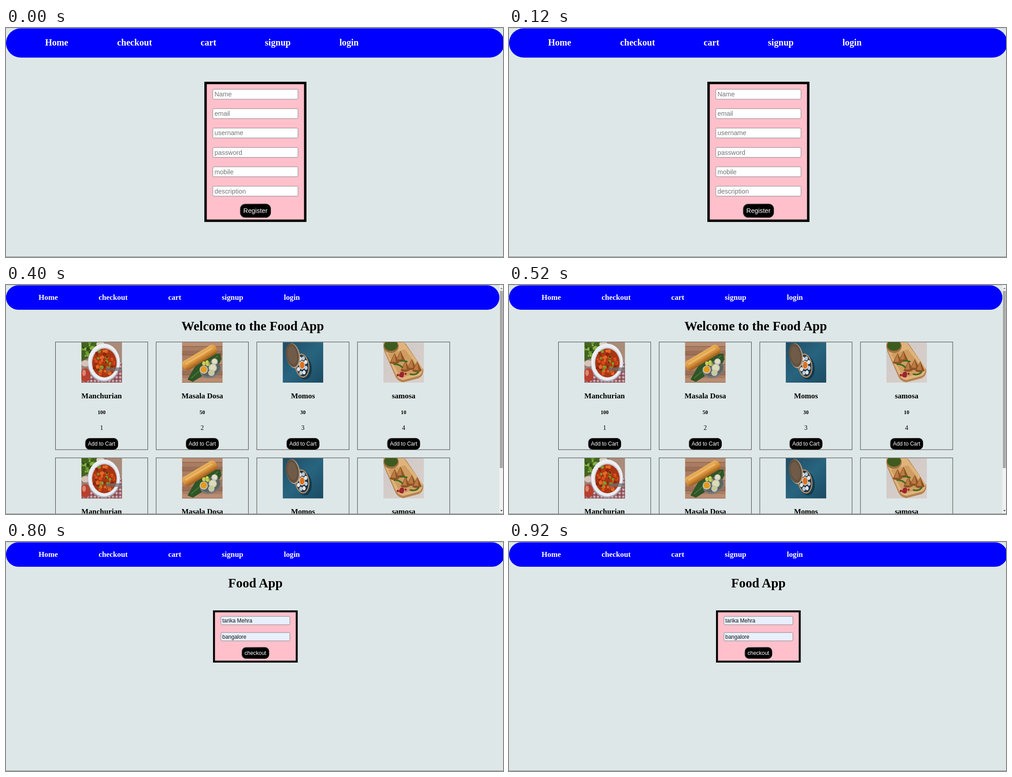
An HTML page for the animation above (1 s loop, 1100 by 509 pixels).

```html
<!DOCTYPE html>
<html lang="en">
<head>
<meta charset="utf-8">
<title>Food App</title>
<style>
  html, body { margin: 0; width: 100%; height: 100%; overflow: hidden; background: #dee7e7; }
  svg { display: block; width: 1100px; height: 509px; }
  .serif { font-family: "Liberation Serif", "Times New Roman", serif; }
  .sans { font-family: "Liberation Sans", Arial, sans-serif; }
  .url { font-family: "Open Sans", "Noto Sans", sans-serif; }
  .bold { font-weight: 700; }
  .mid { text-anchor: middle; }
</style>
</head>
<body>
<svg id="stage" viewBox="0 0 1100 509" xmlns="http://www.w3.org/2000/svg"></svg>
<script>
const STEP = 200;
const H1 = 28.7, H3 = 16.79, H5 = 11.9, BODY = 14.35, FIELD = 11.96;

const text = (x, y, size, label, cls, fill = '#000') =>
  `<text x="${x}" y="${y}" font-size="${size}" class="${cls}" fill="${fill}">${label}</text>`;
const rect = (x, y, w, h, fill, more = '') =>
  `<rect x="${x}" y="${y}" width="${w}" height="${h}" fill="${fill}" ${more}/>`;
const oval = (x, y, rx, ry, fill, more = '') =>
  `<ellipse cx="${x}" cy="${y}" rx="${rx}" ry="${ry}" fill="${fill}" ${more}/>`;
const path = (d, fill, more = '') => `<path d="${d}" fill="${fill}" ${more}/>`;
const turn = (a, x, y) => `transform="rotate(${a} ${x} ${y})"`;

function seeded(seed) {
  return () => (seed = (seed * 16807) % 2147483647) / 2147483647;
}

// Small blobs scattered evenly inside an oval
function scatter(n, seed, cx, cy, rx, ry, colors) {
  const rnd = seeded(seed);
  return Array.from({ length: n }, (_, i) => {
    const a = rnd() * 6.283, d = Math.sqrt(rnd()), r = 2 + rnd() * 2.2;
    return oval((cx + rx * d * Math.cos(a)).toFixed(1), (cy + ry * d * Math.sin(a)).toFixed(1),
      r.toFixed(1), (r * 1.1).toFixed(1), colors[i % colors.length]);
  }).join('');
}

// Dishes, each on a 90 x 90 tile
const dishes = {
  manchurian: () =>
    rect(0, 0, 90, 90, '#97807d') +
    rect(55, 0, 35, 40, '#a98b78') +
    rect(0, 62, 90, 28, 'url(#cloth)') +
    rect(70, 45, 20, 45, 'url(#cloth)') +
    path('M0 0H42L30 14L18 34L0 42Z', '#42641f') +
    scatter(22, 11, 14, 16, 15, 17, ['#6f9a33', '#2f4c18', '#8bb146']) +
    oval(42, 4, 9, 6, '#d9d2bd') +
    oval(9, 47, 9, 7, '#d8c4b6') +
    oval(9, 73, 11, 15, '#b8402f') +
    oval(6, 68, 4, 7, '#d98672') +
    oval(50, 46, 36, 42, '#aeb3bd') +
    oval(50, 44, 35, 41, '#eceef2') +
    oval(51, 45, 29, 34, '#c9ccd3') +
    oval(51, 46, 27, 32, '#a83512') +
    scatter(58, 5, 51, 46, 25, 30, ['#d8501b', '#b5340f', '#e4682a', '#7c9a2c', '#8c260c']) +
    rect(54, 56, 36, 8, '#6d6a6c', 'opacity=".7"'),

  dosa: () =>
    rect(0, 0, 90, 90, '#a97d63') +
    [0, 19, 40, 63, 80].map((y, i) =>
      rect(0, y, 90, 9, i % 2 ? '#9b6e55' : '#b98d71') + rect(0, y + 9, 90, 1, '#80573f')).join('') +
    path('M12 83L28 55L58 27L85 25L87 38L76 62L48 73L24 88Z', '#2f5527') +
    path('M20 80L52 52L80 30', 'none', 'stroke="#4b7a38" stroke-width="2"') +
    oval(63, 61, 24, 18, '#77787a', turn(-20, 63, 61)) +
    oval(63, 59, 22, 16, '#5e655c', turn(-20, 63, 59)) +
    `<g ${turn(-31, 40, 34)}>` +
      rect(-3, 22, 85, 23, 'url(#crust)', 'rx="9"') +
      rect(4, 28, 70, 4, '#f1c175', 'rx="2" opacity=".7"') +
    '</g>' +
    scatter(9, 23, 54, 47, 6, 5, ['#a9bd3f', '#d2cf5e']) +
    [[48, 61, 9, '#e39a1c'], [68, 57, 9, '#dcdcb4'], [72, 43, 7, '#e4ddc6'], [65, 68, 7, '#c5cb95']]
      .map(([x, y, r, c]) => oval(x, y, r, r, '#c4c4bf') + oval(x, y - .5, r - 2, r - 2, c)).join(''),

  momos: () =>
    rect(0, 0, 90, 90, 'url(#sea)') +
    oval(47, 56, 17, 27, '#123a4e', turn(-8, 47, 56)) +
    oval(43, 52, 16, 27, '#b38b63', turn(-8, 43, 52)) +
    oval(43, 52, 13.5, 24, '#1c3448', turn(-8, 43, 52)) +
    Array.from({ length: 8 }, (_, i) => {
      const a = i * Math.PI / 4 + .3;
      return oval((43 + 9 * Math.cos(a)).toFixed(1), (52 + 17 * Math.sin(a)).toFixed(1), 3.6, 4.6,
        i % 2 ? '#dfe5e8' : '#b9c9d3');
    }).join('') +
    oval(43, 51, 6.5, 10, '#e6d8c6') +
    oval(43, 51, 5, 8, '#dd701f') +
    oval(23, 30, 15, 28, '#b9a084', turn(-10, 23, 30)) +
    oval(21.5, 29, 14, 26.5, '#64503f', turn(-10, 21, 29)) +
    oval(21.5, 29, 10, 20, '#705b48', turn(-10, 21, 29)),

  samosa: () =>
    rect(0, 0, 90, 90, 'url(#stone)') +
    path('M2 20L27 77Q32 87 44 89L78 80Q90 74 88 60L50 4Q46 0 40 0H0Z', '#b5834f') +
    path('M2 16L28 73Q33 82 44 84L78 75Q88 70 86 57L48 4Q45 0 40 0H0Z', '#dfb47c') +
    path('M10 26L33 69Q37 76 46 77L74 69Q81 65 79 57L48 16Z', '#cf9d62') +
    oval(17, 9, 17, 15, '#a17240') +
    oval(17, 7, 15, 12, '#3e5b1f') +
    [[24, 37], [37, 32], [48, 54], [62, 50], [74, 55]].map(([x, y]) =>
      path(`M${x - 10} ${y + 9}L${x + 1} ${y - 13}L${x + 11} ${y + 8}Q${x} ${y + 15} ${x - 10} ${y + 9}Z`, '#8f5427') +
      path(`M${x - 7} ${y + 6}L${x + 1} ${y - 11}L${x + 4} ${y + 7}Z`, '#bd7b41')).join('') +
    path('M24 49Q34 48 42 56M60 71Q72 74 78 66M38 40L52 43', 'none',
      'stroke="#3f6a22" stroke-width="3.5" stroke-linecap="round"') +
    scatter(8, 31, 40, 71, 10, 5, ['#9c2430']),
};

const menu = [
  { dish: 'manchurian', name: 'Manchurian', price: 100, id: 1 },
  { dish: 'dosa', name: 'Masala Dosa', price: 50, id: 2 },
  { dish: 'momos', name: 'Momos', price: 30, id: 3 },
  { dish: 'samosa', name: 'samosa', price: 10, id: 4 },
];

const defs = `<defs>
  <pattern id="cloth" width="8" height="8" patternUnits="userSpaceOnUse">
    <rect width="8" height="8" fill="#cbb9bb"/><rect width="4" height="8" fill="#84343f" opacity=".65"/>
    <rect width="8" height="4" fill="#84343f" opacity=".65"/></pattern>
  <linearGradient id="crust" x2="0" y2="1"><stop stop-color="#e9b25c"/><stop offset=".55" stop-color="#d8923a"/><stop offset="1" stop-color="#9a5a1c"/></linearGradient>
  <linearGradient id="sea" x2="1" y2="1"><stop stop-color="#1f4c64"/><stop offset=".5" stop-color="#28647f"/><stop offset="1" stop-color="#1b4a62"/></linearGradient>
  <linearGradient id="stone" x2="1" y2="1"><stop stop-color="#cfc8c6"/><stop offset="1" stop-color="#d9d0cb"/></linearGradient>
  <linearGradient id="bevel" x2="1" y2="1"><stop stop-color="#777"/><stop offset=".5" stop-color="#333"/><stop offset=".8" stop-color="#000"/></linearGradient>
  <clipPath id="tile"><rect width="89.7" height="89.7"/></clipPath>
  ${Object.entries(dishes).map(([id, draw]) => `<g id="${id}" clip-path="url(#tile)">${draw()}</g>`).join('')}
</defs>`;

function nav(zoom, width) {
  const links = [['Home', 72], ['checkout', 205], ['cart', 359], ['signup', 477.5], ['login', 615]];
  return rect(0, .8, width, 54.2 * zoom, '#00f', `rx="${27.1 * zoom}"`) +
    links.map(([label, x]) => text(x * zoom, 32.7 * zoom, H3 * zoom, label, 'serif bold', '#fff')).join('');
}

function button(cx, y, w, h, label, zoom = 1) {
  return rect(cx - w / 2 + .6, y + .6, w - 1.2, h - 1.2, '#000', `rx="${9 * zoom}" stroke="url(#bevel)" stroke-width="1.2"`) +
    text(cx, y + h / 2 + 4.2 * zoom, FIELD * zoom, label, 'sans mid', '#fff');
}

function panel(x, y, w, h, border) {
  return rect(x, y, w, h, '#000') +
    rect(x + border, y + border, w - 2 * border, h - 2 * border, '#ffc0cb');
}

function field(x, y, w, h, label, zoom, fill, ink) {
  return rect(x + .5, y + .5, w - 1, h - 1, fill, 'rx="2" stroke="#858585"') +
    text(x + 3.5 * zoom, y + h / 2 + 4.2 * zoom, FIELD * zoom, label, 'sans', ink);
}

function signForm(labels, action, buttonWidth) {
  const pitch = 43.1, n = labels.length;
  return panel(439, 119.5, 226, 53 + n * pitch, 5.4) +
    labels.map((label, i) => field(457.3, 135.7 + i * pitch, 189.4, 23, label, 1.2, '#fff', '#757575')).join('') +
    button(552, 131.9 + n * pitch, buttonWidth, 31, action, 1.2);
}

function card({ dish, name, price, id }, cx, width, top, action, buttonWidth) {
  return `<g transform="translate(${cx} ${top})">` +
    rect(-width / 2, 0, width, 239.3, 'none', 'stroke="#3a3d3d"') +
    `<use href="#${dish}" x="-44.8" y=".5"/>` +
    text(0, 125.3, H3, name, 'serif bold mid') +
    text(0, 160, H5, price, 'serif bold mid') +
    text(0, 195.6, BODY, id, 'serif mid') +
    button(0, 213.2, buttonWidth, 26, action) + '</g>';
}

const title = (cx, label) => text(cx, 100.8, H1, label, 'serif bold mid');

const scrollbar = () =>
  rect(1092, 0, 8, 509, '#f1f1f1') + rect(1093, 13, 6.5, 394, '#a8a8a8') +
  path('M1094 9L1096.5 6L1099 9Z', '#777') + path('M1094 500L1096.5 503.5L1099 500Z', '#505050');

const statusBar = () =>
  path('M0 492H341Q344 492 344 495V509H0Z', '#d1d3d3') +
  text(3, 503.6, 8.21, 'https://65391cfeaef0e31cac02e4a7--symphonious-nougat-bc34da.netlify.app/login.html', 'url', '#333');

const scenes = [
  () => nav(1.2, 1103) +
    signForm(['Name', 'email', 'username', 'password', 'mobile', 'description'], 'Register', 68.5),

  () => nav(1.2, 1103) + signForm(['username', 'password'], 'login', 45.5) + statusBar(),

  () => nav(1, 1092) + title(546, 'Welcome to the Food App') +
    [126.7, 384.2].map(top => menu.map((item, i) =>
      card(item, 211.6 + i * 222.8, 204.2, top, 'Add to Cart', 73)).join('')).join('') +
    scrollbar(),

  () => nav(1, 1103) + title(552, 'Food App') +
    [menu[0], menu[2]].map((item, i) => card(item, 214.1 + i * 225.1, 207.2, 126.7, 'Remove', 57.5)).join(''),

  () => nav(1, 1103) + title(552, 'Food App') +
    panel(458.2, 152, 187.4, 116, 4.3) +
    ['tarika Mehra', 'bangalore'].map((value, i) =>
      field(475.3, 164.8 + i * 35.9, 153.5, 19.6, value, 1, '#e8f0fe', '#111')).join('') +
    button(552, 233.5, 61, 26, 'checkout'),
];

const stage = document.getElementById('stage');
stage.innerHTML = defs + rect(0, 0, 1100, 509, '#dee7e7') + rect(0, 0, 1100, 1, '#c6cccf') +
  scenes.map(draw => `<g class="scene" visibility="hidden">${draw()}</g>`).join('') +
  rect(0, 508, 1100, 1, '#7d8283');

const layers = [...stage.querySelectorAll('.scene')];
function show(now) {
  const current = Math.floor(now / STEP) % layers.length;
  layers.forEach((layer, i) => layer.setAttribute('visibility', i === current ? 'visible' : 'hidden'));
}

const start = performance.now();
function tick() {
  show(performance.now() - start);
  requestAnimationFrame(tick);
}
tick();
</script>
</body>
</html>
```
